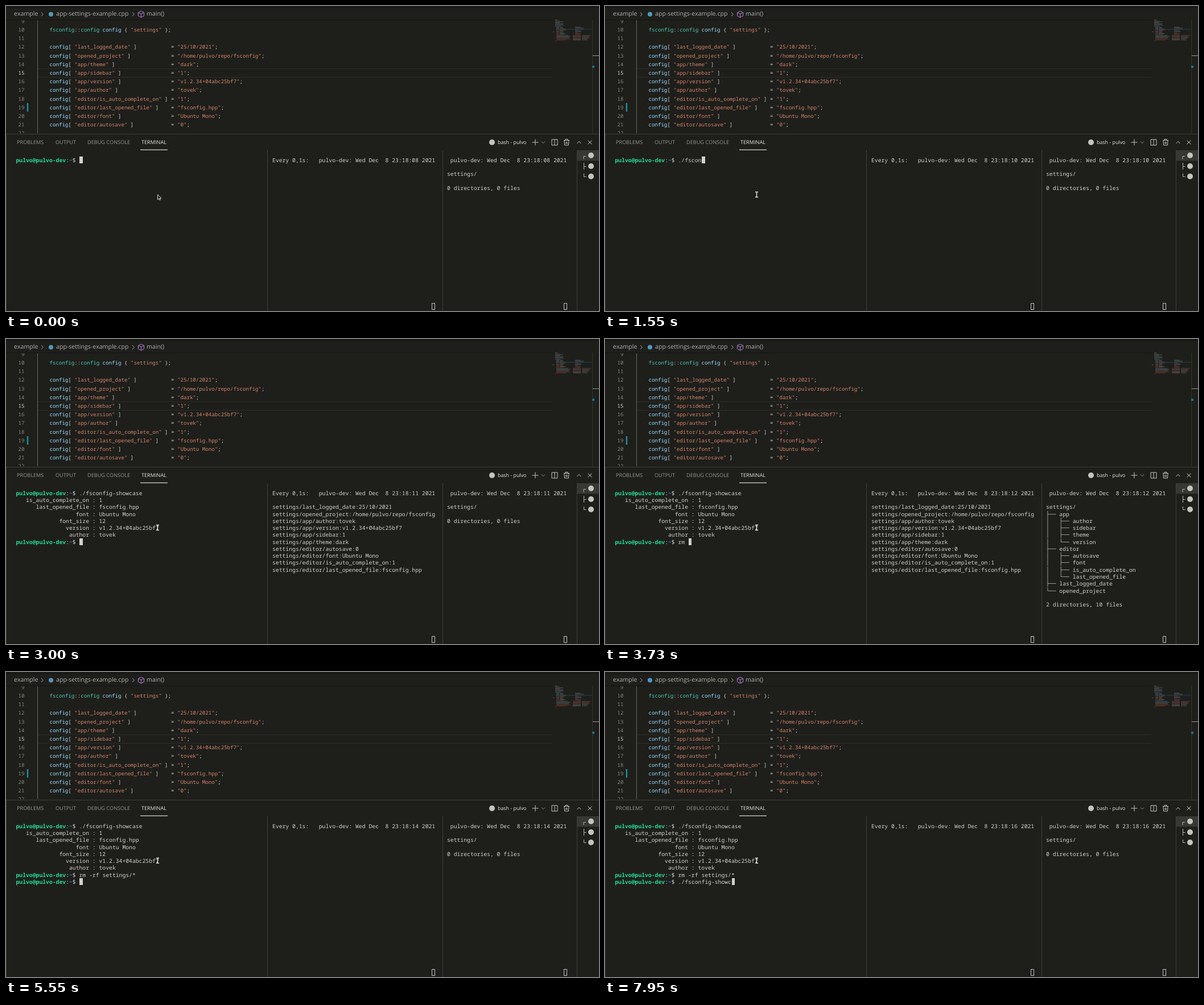
An HTML page for the animation above (8 s loop, 1042 px wide and 537 px high).

```html
<!DOCTYPE html>
<html lang="en">
<head>
<meta charset="utf-8">
<title>Settings demo</title>
<style>
html, body { margin: 0; width: 100%; height: 100%; overflow: hidden; background: #1e1f1b; }
#stage { position: absolute; left: 0; top: 0; width: 1042px; height: 537px; overflow: hidden;
  background: #1e1f1b; color: #d0d0cc; text-rendering: geometricPrecision; font-kerning: none; }
#stage > * { position: absolute; }
.ui { font-family: "Open Sans", "Noto Sans", sans-serif; line-height: 16px; white-space: pre; }
.crumb { font-size: 10.6px; top: 6px; color: #b0b0aa; }
.tab { font-size: 9.15px; top: 232px; color: #94958f; }
.on { color: #e4e4e0; }
pre { margin: 0; font-family: "Noto Sans Mono", "DejaVu Sans Mono", monospace; }
#editor { left: 0; top: 25px; width: 960px; height: 199px; overflow: hidden; }
#editor pre { position: absolute; top: -6.3px; font-size: 9.13px; line-height: 15.2px; }
#nums { left: 0; width: 32.5px; text-align: right; color: #85867f; }
#nums b { font-weight: 400; color: #d0d0ca; }
#code { left: 76.5px; }
.v { color: #9cdcfe; }
.t { color: #4ec9b0; }
.s { color: #d0836c; }
.term { top: 265.8px; font-size: 9.74px; line-height: 12.27px; }
.p { color: #23dc95; font-weight: 700; }
.d { color: #3b8eea; font-weight: 700; }
#caret { width: 5.6px; height: 12px; background: #d2d2cc; }
svg { left: 0; top: 0; }
</style>
</head>
<body>
<div id="stage">
  <div id="editor"><pre id="nums"></pre><pre id="code"></pre></div>
  <svg width="1042" height="537" fill="none" stroke="#c5c5c0">
    <path d="M0 2H1042" stroke="#191a17" stroke-width="4"/>
    <path d="M0 24.5H960" stroke="#151613"/>
    <path d="M55.5 25V224" stroke="#686963"/>
    <path d="M56 110.5H960M56 125.5H960" stroke="#2b2c28"/>
    <path d="M38 171V186" stroke="#1f8c9c" stroke-width="2.5"/>
    <path d="M1030.5 24V224" stroke="#33342f"/>
    <path d="M1031 87.5H1042" stroke="#96978f"/>
    <path d="M1030 107H1034" stroke="#1b6f8c" stroke-width="4"/>
    <path d="M0 225.5H1042M459.5 254V537M767.5 254V537M1003.5 254V537M.5 225V537" stroke="#3d3e39"/>
    <path d="M236 253.300H284" stroke="#b8b8b3" stroke-width="1.400"/>
    <path d="M1004 254H1042V272.5H1004Z" fill="#373833" stroke="none"/>
    <g id="map" stroke-width=".8"></g>
    <!-- breadcrumb -->
    <path d="M62 11l3.5 3.5-3.5 3.5M222 11l3.5 3.5-3.5 3.5" stroke="#a0a09a"/>
    <circle cx="79" cy="14.5" r="4" fill="#519aba" stroke="none"/>
    <path d="M237.5 9l5 2.5v6l-5 2.5-5-2.5v-6zM232.5 11.5l5 2.5 5-2.5M237.5 14v6" stroke="#b180d7"/>
    <!-- panel actions -->
    <g fill="#c5c5c0" stroke="none">
      <circle cx="854" cy="240" r="5"/>
      <circle cx="1028" cy="263" r="5"/>
      <circle cx="1028" cy="282" r="5"/>
      <circle cx="1028" cy="300" r="5"/>
    </g>
    <path d="M924.5 240H935.5M930 234.5V245.5"/>
    <path d="M941 238.5l3 3 3-3" stroke="#94958f"/>
    <path d="M959 235h10v10h-10zM964 235v10"/>
    <path d="M980 236.5h10M983 236v-1.5h4v1.5M981 237l.6 8h6.8l.6-8M984 239v4M986 239v4"/>
    <path d="M1003.5 242l3.5-3.5 3.5 3.5M1022.5 236.5l7 7M1029.5 236.5l-7 7"/>
    <path d="M1019 264.5h-4v5M1015.5 276v12M1015.5 282.5h4M1015.5 295v5.5h4" stroke="#b5b5af"/>
    <path d="M748.5 523.5h5v11h-5zM980.5 523.5h5v11h-5z"/>
  </svg>
  <span class="ui crumb" style="left:14px">example</span>
  <span class="ui crumb" style="left:88px">app-settings-example.cpp</span>
  <span class="ui crumb" style="left:247px">main()</span>
  <span class="ui tab" style="left:19px">PROBLEMS</span>
  <span class="ui tab" style="left:87px">OUTPUT</span>
  <span class="ui tab" style="left:143px">DEBUG CONSOLE</span>
  <span class="ui tab on" style="left:238px">TERMINAL</span>
  <span class="ui tab on" style="left:864px;font-size:8.9px">bash - pulvo</span>
  <pre class="term" id="shell" style="left:17.5px"></pre>
  <pre class="term" id="watch" style="left:468px"></pre>
  <pre class="term" id="tree" style="left:775px"></pre>
  <div id="caret"></div>
  <svg width="1042" height="537" fill="none">
    <path id="arrow" d="M266.5 332v9l2.2-2 1.4 2.8 1.4-.7-1.4-2.7h2.7z" fill="#1a1a1a" stroke="#eee" stroke-width=".9"/>
    <path id="beam" d="M264 327.5h2l.5.7.5-.7h2M264 336.5h2l.5-.7.5.7h2M266.5 328v8" stroke="#e8e8e4" stroke-width="1.4"/>
  </svg>
</div>
<script>
const $ = id => document.getElementById(id);
const LOOP = 8000, USER = "pulvo", AUTHOR = "tovek", HOST = USER + "-dev";
const VERSION = "v1.2.34+04abc25bf7", REPO = `/home/${USER}/repo/fsconfig`;
const ADVANCE = 5.845, ROW = 12.27;

// editor
const settings = [
  ["last_logged_date", "25/10/2021"], ["opened_project", REPO],
  ["app/theme", "dark"], ["app/sidebar", "1"], ["app/version", VERSION], ["app/author", AUTHOR],
  ["editor/is_auto_complete_on", "1"], ["editor/last_opened_file", "fsconfig.hpp"],
  ["editor/font", "Ubuntu Mono"], ["editor/autosave", "0"]
];
const tag = (c, s) => `<span class="${c}">${s}</span>`;
const str = s => tag("s", `"${s}"`);
const assign = ([key, val]) =>
  `${tag("v", "config")}[ ${str(key)} ]${" ".repeat(27 - key.length)}= ${str(val)};`;
$("code").innerHTML = ["",
  `${tag("t", "fsconfig")}::${tag("t", "config")} ${tag("v", "config")} { ${str("settings")} };`,
  "", ...settings.map(assign)].join("\n");
$("nums").innerHTML = Array.from({ length: 14 }, (_, i) => i + 9)
  .map(n => n === 15 ? `<b>${n}</b>` : n).join("\n");

// minimap
const hues = ["#b8584c", "#b8584c", "#6f9fb8", "#a8a8a2"];
let seed = 7, map = "";
const rnd = () => (seed = seed * 16807 % 2147483647) / 2147483647;
const dash = (x, y, w) => {
  map += `<path d="M${x} ${y}h${w}" stroke="${hues[Math.floor(rnd() * hues.length)]}" opacity=".5"/>`;
};
for (let y = 24.5; y < 62; y += 1.6) {
  if (y < 37) dash(965, y, 4 + rnd() * 14);
  else if (y < 51) { dash(967, y, 5); dash(973, y, 5 + rnd() * 8); dash(1000, y, 4 + rnd() * 12); }
  else if (y < 60) { dash(967, y, 16 + rnd() * 10); dash(996, y, 14); dash(1012, y, 8 + rnd() * 9); }
  else dash(965, y, 2);
}
$("map").innerHTML = map + '<path d="M966 41h64" stroke="#244464"/><path d="M961 45.5h2" stroke="#1f8c9c"/>';

// terminal
const prompt = `${tag("p", `${USER}@${HOST}`)}:${tag("d", "~")}$ `;
const report = [
  ["is_auto_complete_on", 1], ["last_opened_file", "fsconfig.hpp"], ["font", "Ubuntu Mono"],
  ["font_size", 12], ["version", VERSION], ["author", AUTHOR]
].map(([k, v]) => `${k.padStart(22)} : ${v}`);
const value = Object.fromEntries(settings);
const files = ["last_logged_date", "opened_project", "app/author", "app/version", "app/sidebar",
  "app/theme", "editor/autosave", "editor/font", "editor/is_auto_complete_on", "editor/last_opened_file"]
  .map(k => `settings/${k}:${value[k]}`).join("\n");
const branch = (name, kids) => [`├── ${name}`,
  ...kids.map((k, i) => `│   ${i < kids.length - 1 ? "├" : "└"}── ${k}`)];
const fullTree = ["settings/",
  ...branch("app", ["author", "sidebar", "theme", "version"]),
  ...branch("editor", ["autosave", "font", "is_auto_complete_on", "last_opened_file"]),
  "├── last_logged_date", "└── opened_project", "", "2 directories, 10 files"].join("\n");
const emptyTree = "settings/\n\n0 directories, 0 files";

// key press times for each command, and when it is entered
const RUN = "./fsconfig-showcase";
const commands = [
  { text: RUN, enter: 2950, output: report, keys: [1000, 1090, 1140, 1180, 1270, 1360, 1550,
    1640, 1730, 1820, 1910, 2000, 2140, 2230, 2320, 2500, 2590, 2640, 2820] },
  { text: "rm -rf settings/*", enter: 5550, output: [], keys: [3410, 3550, 3730, 3820, 3910, 4090,
    4180, 4320, 4410, 4550, 4640, 4680, 4770, 4820, 4910, 5140, 5270] },
  { text: RUN, enter: LOOP, output: [], keys: [6000, 6180, 6270, 6320, 6450, 6590, 6730,
    7050, 7140, 7180, 7320, 7410, 7500, 7640, 7770, 7950] }
];

function shell(t) {
  const lines = [];
  for (const { text, keys, enter, output } of commands) {
    const typed = text.slice(0, keys.filter(k => k <= t).length);
    lines.push(prompt + typed);
    if (t < enter) return { lines, col: HOST.length + USER.length + 5 + typed.length };
    lines.push(...output);
  }
}

const shown = {};
function put(id, html) {
  if (shown[id] !== html) $(id).innerHTML = shown[id] = html;
}

function draw(t) {
  const { lines, col } = shell(t);
  put("shell", lines.join("\n"));
  $("caret").style.left = 18 + col * ADVANCE + "px";
  $("caret").style.top = 265 + (lines.length - 1) * ROW + "px";

  const sec = 8 + Math.floor((t + 910) / 1000);
  const clock = `${HOST}: Wed Dec  8 23:18:${String(sec).padStart(2, "0")} 2021\n\n`;
  put("watch", `Every 0,1s:   ${clock}${t >= 3000 && t < 5550 ? files : ""}`);
  put("tree", ` ${clock}${t >= 3050 && t < 5550 ? fullTree : emptyTree}`);

  $("arrow").style.display = t < 1000 ? "" : "none";
  $("beam").style.display = t < 1000 ? "none" : "";
}

const start = performance.now();
function tick() {
  draw((performance.now() - start) % LOOP);
  requestAnimationFrame(tick);
}
tick();
</script>
</body>
</html>
```
